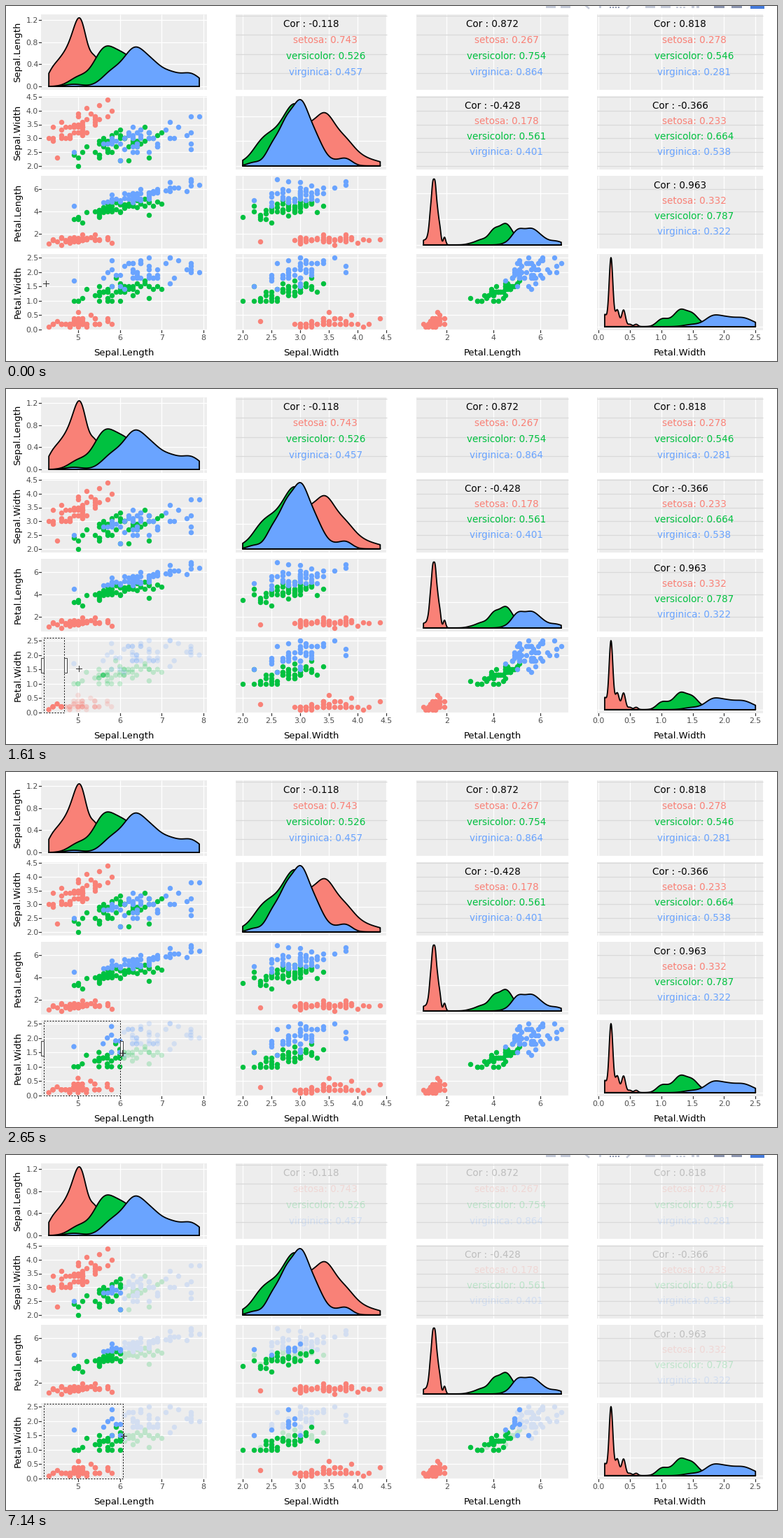
A matplotlib script that plays this animation: 1101x508 px, repeating every 8000 ms.

```python
import numpy as np
import matplotlib.pyplot as plt
from matplotlib.animation import FuncAnimation
from matplotlib.colors import to_rgb, to_rgba
from matplotlib.patches import Polygon, Rectangle

W, H, DPI = 1101, 508, 64
PX = 72 / DPI  # points per pixel
LOOP, INTERVAL = 8000, 50

PANEL, INK = "#ededed", "#333333"
COLORS = ["#f98177", "#00c140", "#6aa4ff"]
SPECIES = ["setosa", "versicolor", "virginica"]
FADE = 0.2

COLS = [(50.4, 286.8), (328.2, 544.2), (586.3, 802.7), (844.2, 1081)]
ROWS = [(12, 120), (129.2, 233.6), (242.8, 346.6), (355.1, 463.8)]
FEATURES = [  # name, low, high, ticks, tick format, density grid step
    ("Sepal.Length", 4.3, 7.9, np.arange(5, 9), "%g", 0.4),
    ("Sepal.Width", 2.0, 4.4, np.arange(2, 4.6, 0.5), "%.1f", 0.5),
    ("Petal.Length", 1.0, 6.9, np.arange(2, 7, 2), "%g", 1),
    ("Petal.Width", 0.1, 2.5, np.arange(0, 2.6, 0.5), "%.1f", 2),
]

PAIRS = np.triu_indices(4, 1)
OVERALL = [-0.118, 0.872, 0.818, -0.428, -0.366, 0.963]
CORRELATIONS = [
    [0.743, 0.267, 0.278, 0.178, 0.233, 0.332],
    [0.526, 0.754, 0.546, 0.561, 0.664, 0.787],
    [0.457, 0.864, 0.281, 0.401, 0.538, 0.322],
]

# Per feature: first bin in tenths, then the count in each 0.1 bin.
setosa_bins = [
    (43, [1, 3, 1, 4, 2, 5, 4, 8, 8, 3, 1, 5, 2, 0, 2, 1]),
    (23, [1, 0, 0, 0, 0, 0, 1, 6, 4, 5, 2, 9, 6, 3, 3, 4, 2, 1, 1, 1, 0, 1]),
    (10, [1, 1, 2, 7, 13, 13, 7, 4, 0, 2]),
    (1, [5, 29, 7, 7, 1, 1]),
]
versicolor_bins = [
    (49, [1, 2, 1, 1, 0, 1, 5, 5, 5, 3, 2, 4, 4, 2, 3, 2, 1, 2, 3, 1, 1, 1]),
    (20, [1, 0, 2, 3, 3, 4, 3, 5, 6, 7, 8, 3, 3, 1, 1]),
    (30, [1, 0, 0, 2, 0, 2, 1, 1, 1, 3, 5, 3, 4, 2, 4, 7, 3, 5, 2, 2, 1, 1]),
    (10, [7, 3, 5, 13, 7, 10, 3, 1, 1]),
]
virginica_bins = [
    (49, [1, 0, 0, 0, 0, 0, 0, 1, 1, 3, 1, 2, 2, 2, 6, 5, 4, 0, 5, 2, 3,
          0, 1, 3, 1, 1, 0, 1, 4, 0, 1]),
    (22, [1, 0, 0, 4, 2, 4, 8, 2, 12, 4, 5, 3, 2, 0, 1, 0, 2]),
    (45, [1, 0, 0, 2, 3, 3, 7, 2, 2, 2, 3, 6, 3, 3, 2, 2, 3, 0, 1, 1, 0,
          1, 2, 0, 1]),
    (14, [1, 2, 1, 1, 11, 5, 6, 6, 3, 8, 3, 3]),
]

# Outlying flowers that stand clear of the clouds, in tenths.
setosa_marks = [
    (43, 30, 11, 1), (45, 23, 13, 3), (57, 44, 15, 4), (58, 40, 12, 2),
    (52, 41, 15, 1), (55, 42, 14, 2), (44, 29, 14, 2), (57, 38, 17, 3),
    (46, 36, 10, 2), (50, 35, 16, 6),
]
versicolor_marks = [
    (49, 24, 33, 10), (50, 20, 35, 10), (50, 23, 33, 10), (51, 25, 30, 11),
    (52, 27, 39, 14), (70, 32, 47, 14), (69, 31, 49, 15), (59, 32, 48, 18),
    (60, 22, 40, 10), (62, 22, 45, 15),
]
virginica_marks = [
    (49, 25, 45, 17), (79, 38, 64, 20), (77, 38, 67, 22), (77, 26, 69, 23),
    (77, 28, 67, 20), (72, 36, 61, 25), (60, 22, 50, 15), (61, 26, 56, 14),
    (72, 30, 58, 16), (58, 28, 51, 24),
]

# start ms, cursor x, cursor y, right brush edge, toolbar opacity
STEPS = [
    (0, 56.5, 396.5, None, 1), (150, 55.5, 396.5, None, 1),
    (840, 54.5, 396.5, None, 1), (1280, 66.5, 396.5, None, 1),
    (1430, 86.5, 399.5, 69, 0.6), (1610, 103.5, 399.5, 82, 0),
    (1940, 126.5, 400.5, 115, 0), (2230, 151.5, 400.5, 142, 0),
    (2500, 163.5, 401.5, 157, 0), (2650, 165.5, 401.5, 162.5, 0),
    (2800, 167.5, 401.5, 165, 0), (2940, 167.5, 401.5, 166, 0),
    (6990, 167.5, 401.5, 166, 0.6), (7140, 167.5, 401.5, 166, 1),
]
LINKED_FROM = 6990
BRUSH_LEFT = 53.5


def sample(bins, marks, correlation, rng):
    """Flowers with the given histograms, outliers and correlations."""
    columns = []
    for k, (first, counts) in enumerate(bins):
        rest = np.repeat(first + np.arange(len(counts)), counts).tolist()
        fixed = [mark[k] for mark in marks]
        for value in fixed:
            rest.remove(value)
        rng.shuffle(rest)
        columns.append(fixed + rest)
    data = np.array(columns) / 10

    def error():
        return ((np.corrcoef(data)[PAIRS] - correlation) ** 2).sum()

    best = error()
    for _ in range(4000):
        k = rng.integers(4)
        i, j = rng.integers(len(marks), data.shape[1], 2)
        data[k, [i, j]] = data[k, [j, i]]
        trial = error()
        if trial < best:
            best = trial
        else:
            data[k, [i, j]] = data[k, [j, i]]
    return data


def density(values, grid):
    q1, q3 = np.percentile(values, [25, 75])
    width = 0.9 * min(values.std(ddof=1), (q3 - q1) / 1.34) * len(values) ** -0.2
    z = (grid[:, None] - values) / width
    return np.exp(-z * z / 2).mean(axis=1) / (width * np.sqrt(2 * np.pi))


def scaled(v, low, high, start, end):
    pad = 0.05 * (high - low)
    return start + (v - low + pad) / (high - low + 2 * pad) * (end - start)


def to_x(k, v):
    return scaled(v, *FEATURES[k][1:3], *COLS[k])


def to_y(k, v):
    top, bottom = ROWS[k]
    return scaled(v, *FEATURES[k][1:3], bottom, top)


def mix(color):
    return FADE * np.array(to_rgb(color)) + (1 - FADE) * np.array(to_rgb(PANEL))


fig = plt.figure(figsize=(W / DPI, H / DPI), dpi=DPI, facecolor="white")
ax = fig.add_axes((0, 0, 1, 1))
ax.set_xlim(0, W)
ax.set_ylim(H, 0)
ax.axis("off")


def line(xs, ys, color, width=1.0, z=2, **style):
    return ax.plot(xs, ys, color=color, lw=width * PX, zorder=z, **style)[0]


def label(x, y, text, size, color="black", ha="center"):
    return ax.text(x, y + 0.36 * size, text, fontsize=size * PX, color=color,
                   ha=ha, va="baseline", family="DejaVu Sans", zorder=6)


def box(x, y, w, h, color, z=1, **style):
    return ax.add_patch(Rectangle((x, y), w, h, fc=color, zorder=z, **style))


def draw_grid(col, row, heights, color):
    left, right = COLS[col]
    top, bottom = ROWS[row]
    box(left, top, right - left, bottom - top, PANEL, lw=0)
    for x in to_x(col, FEATURES[col][3]):
        line([x, x], [top, bottom], "white", 1.3, solid_capstyle="butt")
    for y in heights:
        if top < y < bottom:
            line([left, right], [y, y], color, 1.3, solid_capstyle="butt")


def draw_density(k):
    _, low, high, _, _, step = FEATURES[k]
    top, bottom = ROWS[k]
    grid = np.linspace(low, high, 512)
    curves = [density(data[k], grid) for data in flowers]
    peak = max(curve.max() for curve in curves)

    def height(v):
        return scaled(v, 0, peak, bottom, top)

    ticks = np.arange(0, peak, step)
    draw_grid(k, k, height(ticks), "white")
    xs = to_x(k, np.r_[grid[0], grid, grid[-1]])
    for curve, color in zip(curves, COLORS):
        ys = height(np.r_[0, curve, 0])
        ax.add_patch(Polygon(np.c_[xs, ys], closed=True, fc=color, ec="black",
                             lw=1.8 * PX, joinstyle="round", zorder=3))
    return ticks, height(ticks)


def draw_scatter(col, row):
    draw_grid(col, row, to_y(row, FEATURES[row][3]), "white")
    for data, color in zip(flowers, COLORS):
        x, y = to_x(col, data[col]), to_y(row, data[row])
        chosen = data[0] < 6.05
        style = dict(s=(7.4 * PX) ** 2, linewidths=0, color=color)
        base = ax.scatter(x, y, zorder=3, **style)
        top = ax.scatter(x[chosen], y[chosen], zorder=4, **style)
        dots.append((base, top, color, x, (col, row) == (0, 3)))


def draw_correlation(col, row, values):
    draw_grid(col, row, to_y(row, FEATURES[row][3]), "#d9d9d9")
    left, right = COLS[col]
    top, bottom = ROWS[row]
    names = ["Cor "] + SPECIES
    for n, (name, value) in enumerate(zip(names, values)):
        x = (left + right) / 2 + (20 if n else 0)
        y = top + (0.124 + 0.212 * n) * (bottom - top)
        color = COLORS[n - 1] if n else "black"
        notes.append(label(x, y, f"{name}: {value:.3f}", 13.5, color))


def draw_axes(first_ticks, first_heights):
    left, bottom = COLS[0][0], ROWS[3][1]
    for k, (name, _, _, ticks, fmt, _) in enumerate(FEATURES):
        middle = sum(COLS[k]) / 2
        label(middle, 495, name, 13.1)
        ax.text(17, sum(ROWS[k]) / 2, name, fontsize=13.1 * PX, rotation=90,
                ha="center", va="center", family="DejaVu Sans")
        for v, x in zip(ticks, to_x(k, ticks)):
            label(x, 474.5, fmt % v, 11, "#4d4d4d")
            line([x, x], [bottom, bottom + 3.5], INK, 1.2)
        values, heights = (ticks, to_y(k, ticks)) if k else (first_ticks, first_heights)
        for v, y in zip(values, heights):
            label(46, y, (fmt if k else "%.1f") % v, 11, "#4d4d4d", "right")
            line([left - 3.5, left], [y, y], INK, 1.2)


def draw_toolbar():
    light, dark = "#c4cad9", "#8d96b0"
    parts = [box(x, -6, 14, 9, light, lw=0) for x in (771, 792, 913, 935)]
    parts += [box(x, -6, 15, 9, dark, lw=0) for x in (1011, 1036)]
    parts += [box(x, 1, 2, 2, dark, lw=0) for x in range(862, 878, 4)]
    parts += [box(x, 1, 3, 2, light, lw=0) for x in (957, 962, 967)]
    parts += [box(x, -6, w, 9, light, lw=0) for x, w in ((979, 4), (986, 4), (847, 3))]
    parts += [line([x, x + dx], [-2, 3], light, 2.5) for x, dx in ((826, 6), (892, -5))]
    parts.append(box(1063, -16, 20, 20, "#447adb", lw=0))
    return parts


rng = np.random.default_rng(7)
flowers = [
    sample(bins, marks, cor, rng)
    for bins, marks, cor in zip(
        (setosa_bins, versicolor_bins, virginica_bins),
        (setosa_marks, versicolor_marks, virginica_marks), CORRELATIONS)
]

dots, notes = [], []
diagonal = [draw_density(k) for k in range(4)]
for n, (row, col) in enumerate(zip(*PAIRS)):
    draw_scatter(row, col)
    draw_correlation(col, row, [OVERALL[n]] + [c[n] for c in CORRELATIONS])
draw_axes(*diagonal[0])
toolbar = draw_toolbar()

outline = [line([], [], "white", 1, 7),
           line([], [], "black", 1, 8, linestyle=(0, (2, 2)), dash_capstyle="butt")]
handles = [box(x, 384.5, 4, 21, "white", 9, ec="#444444", lw=PX)
           for x in (BRUSH_LEFT - 4, 0)]
cursor = [line([], [], INK, 1, 10) for _ in range(2)]


def update(frame):
    # Changes fall between ticks, so each tick covers the step that begins in it.
    now = frame * INTERVAL + INTERVAL - 1
    start, cx, cy, edge, opacity = [s for s in STEPS if s[0] <= now][-1]
    linked = start >= LINKED_FROM
    brushing = edge is not None and not linked

    for base, top, color, x, brushed in dots:
        top.set_visible(linked)
        if linked:
            base.set_facecolor(mix(color))
        elif brushing and brushed:
            base.set_facecolor([to_rgba(color, 1 if v <= edge + 0.5 else FADE) for v in x])
        else:
            base.set_facecolor(color)
    for note in notes:
        note.set_alpha(FADE if linked else 1)
    for part in toolbar:
        part.set_alpha(opacity)

    for border in outline:
        border.set_visible(edge is not None)
    for handle in handles:
        handle.set_visible(brushing)
    if edge is not None:
        right = int(edge) + 0.5
        for border in outline:
            border.set_data([BRUSH_LEFT, right, right, BRUSH_LEFT, BRUSH_LEFT],
                            [355.5, 355.5, 462.5, 462.5, 355.5])
        handles[1].set_x(right)
    cursor[0].set_data([cx - 4, cx + 4], [cy, cy])
    cursor[1].set_data([cx, cx], [cy - 4, cy + 4])
    return []


animation = FuncAnimation(fig, update, frames=LOOP // INTERVAL,
                          interval=INTERVAL, repeat=True, repeat_delay=0)
plt.show()
```
